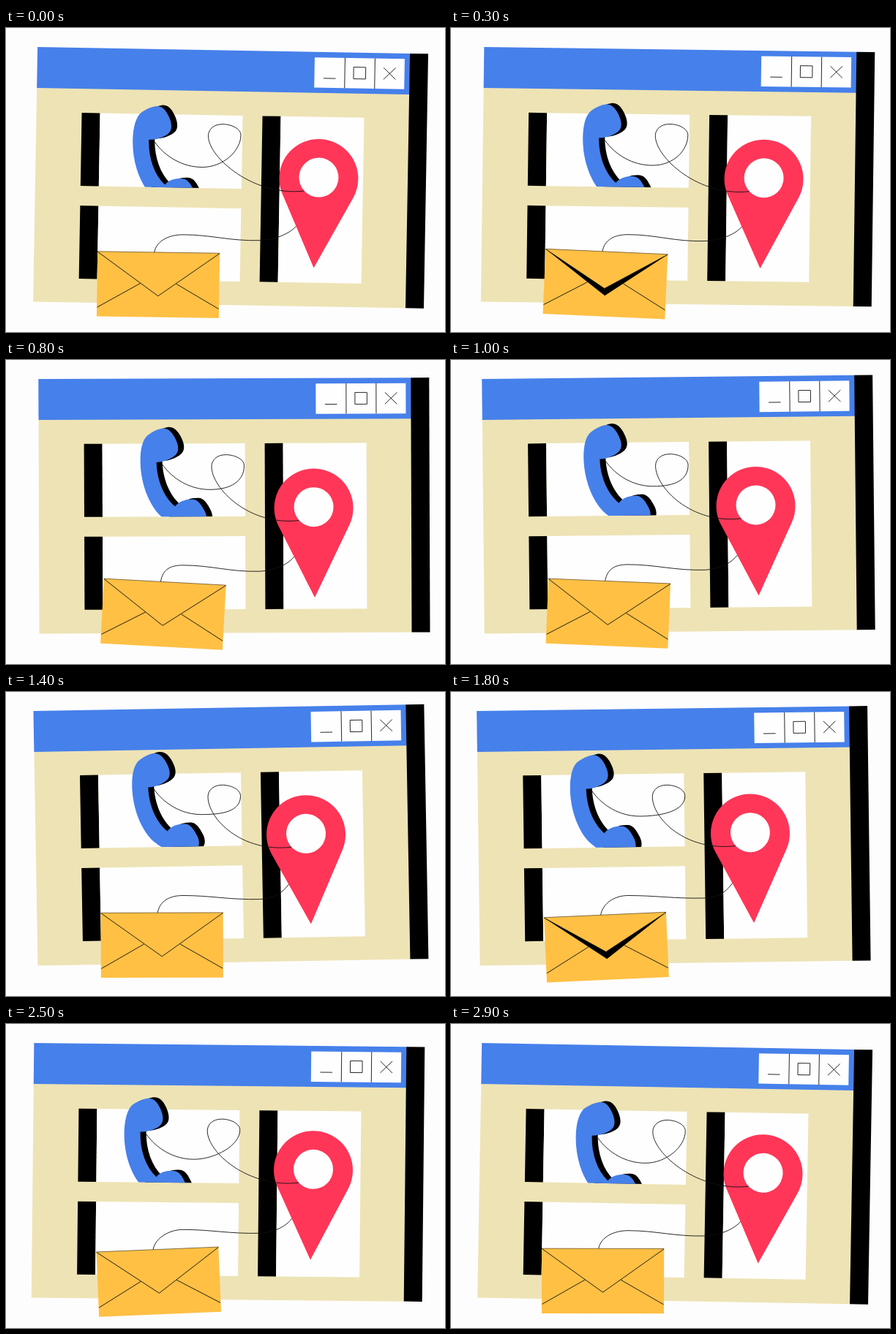
These frames come from a looping animation (600x416 px, 3 s). An HTML page with a canvas:

```html
<!DOCTYPE html>
<html lang="en">
<head>
<meta charset="utf-8">
<title>Contact window</title>
<style>
  html, body { margin: 0; width: 100%; height: 100%; overflow: hidden; background: #fefdfe; }
  canvas { display: block; width: 600px; height: 416px; }
</style>
</head>
<body>
<canvas id="stage" width="600" height="416"></canvas>
<script>
const LOOP = 3000, STEP = 100;
const BLUE = '#4680ea', CREAM = '#eee3b5', YELLOW = '#ffc044', RED = '#ff3658';
const PAPER = '#fefdfe', WHITE = '#fefefe', BLACK = '#000';
const ctx = document.getElementById('stage').getContext('2d');

// Handset outline around its inner corner
const handset = new Path2D(`M-6 1C2 1 13-2 20-8C26-13 25-22 20-32C15-42 9-46 2-45
  C-4-44-10-41-16-37C-25-31-28-15-28 1C-28 35-14 66 2 78C15 90 40 96 54 90
  C62 86 62 77 58 69C54 61 50 54 43 53C33 52 23 55 18 62C2 48-6 24-6 1Z`);

// Periodic sway: mean, amplitude, time of the maximum, and a bob at twice the rate
const wave = (t, period) => Math.cos(t / period * 2 * Math.PI);
const sway = (t, mean, amp, peak, bob = 0) =>
  mean + amp * wave(t - peak, LOOP) + bob * wave(t - 660, LOOP / 2);
const rad = deg => deg * Math.PI / 180;

function place(x, y, deg) {
  ctx.translate(x, y);
  ctx.rotate(rad(deg));
}

function turn(o, deg, x, y) {
  const c = Math.cos(rad(deg)), s = Math.sin(rad(deg));
  return { x: o.x + x * c - y * s, y: o.y + x * s + y * c };
}

function rect(color, x1, y1, x2, y2) {
  ctx.fillStyle = color;
  ctx.fillRect(x1, y1, x2 - x1, y2 - y1);
}

function poly(...pts) {
  ctx.beginPath();
  for (let i = 0; i < pts.length; i += 2) ctx.lineTo(pts[i], pts[i + 1]);
}

function line(...pts) {
  poly(...pts);
  ctx.stroke();
}

function pose(t) {
  return {
    win: { x: sway(t, 40.2, 5.5, 1000, 0.4), y: 374.4, r: sway(t, 0, 1, -50) },
    phone: { x: sway(t, 199.5, 12.5, 680), y: sway(t, 140.5, 11.5, -20), r: sway(t, 0, 2.3, -270) },
    pin: { x: sway(t, 418.3, 4.6, 500), y: sway(t, 322.5, 6.6, 240), r: sway(t, 0, 3.2, -50) },
    mail: { x: sway(t, 211.6, 3.2, 1170, 1.2), y: sway(t, 349.7, 3.1, -370, 0.7), r: sway(t, 0, 3.3, 630) },
    loop: { x: sway(t, 1.7, 2.8, 670, 1.3), y: sway(t, 2.4, 2.3, 100) }
  };
}

function enterWindow(w) {
  place(w.x, w.y, w.r);
  ctx.translate(-36, -374.4);
}

function panel(x, y, right, bottom) {
  rect(BLACK, x, y, x + 25, bottom);
  rect(WHITE, x + 25, y, right, bottom);
}

function drawWindow(w) {
  ctx.save();
  enterWindow(w);
  rect(CREAM, 36, 81, 545.5, 374.4);
  rect(BLUE, 36, 26, 545.5, 82);
  rect(BLACK, 545, 26, 570, 374.4);
  panel(98, 115, 318, 215);
  panel(98, 242, 318, 342);
  panel(345, 115, 484, 342);
  rect(WHITE, 415, 33.5, 538, 75);
  line(456.5, 33.5, 456.5, 75);
  line(497.5, 33.5, 497.5, 75);
  line(427.5, 62, 444, 62);
  ctx.strokeRect(468.5, 46, 16.5, 16);
  line(509.5, 46, 526, 62);
  line(526, 46, 509.5, 62);
  ctx.restore();
}

function drawPhoneCord(p, loop, pin) {
  const { x, y } = p, dx = loop.x, dy = loop.y;
  const hole = turn(pin, pin.r, 0, -124);
  const ex = hole.x - 20, ey = hole.y + 18.5;
  const left = 275.5 + dx, right = 320 + dx;
  ctx.beginPath();
  ctx.moveTo(x + 2, y + 4);
  ctx.bezierCurveTo(x + 16, y + 24, x + 40, y + 38.5, x + 67, y + 38.5);
  ctx.bezierCurveTo(x + 96, y + 38.5, right, 163 + dy, right, 142 + dy);
  ctx.bezierCurveTo(right, 133 + dy, 307 + dx, 127 + dy, 295 + dx, 127 + dy);
  ctx.bezierCurveTo(283 + dx, 127 + dy, left, 134 + dy, left, 143 + dy);
  ctx.bezierCurveTo(left, 173 + dy, ex - 68, ey + 8, ex, ey);
  ctx.stroke();
}

function drawMailCord(t, mail, pin) {
  const s = turn(mail, mail.r, -6, -44);
  const e = turn(pin, pin.r, -21, -66);
  const cx = 242, cy = sway(t, 280.6, 2.3, 100);
  const mx = 346, my = sway(t, 286.8, 4.8, 300);
  ctx.beginPath();
  ctx.moveTo(s.x, s.y);
  ctx.bezierCurveTo(s.x + 3, s.y - 17, cx - 18, cy, cx, cy);
  ctx.bezierCurveTo(cx + 38, cy, mx - 40, my + 1, mx, my);
  ctx.bezierCurveTo(mx + 22, my - 1, e.x - 9, e.y + 20, e.x, e.y);
  ctx.stroke();
}

function drawPhone(w, p) {
  ctx.save();
  ctx.save();
  enterWindow(w);
  ctx.beginPath();
  ctx.rect(98, 0, 220, 215);
  ctx.restore();
  ctx.clip();
  place(p.x, p.y, p.r);
  ctx.translate(8, -1.7);
  ctx.fillStyle = BLACK;
  ctx.fill(handset);
  ctx.translate(-8, 1.7);
  ctx.fillStyle = BLUE;
  ctx.fill(handset);
  ctx.restore();
}

function drawPin(p) {
  const R = 54, D = 122.5, a = Math.asin(R / D);
  ctx.save();
  place(p.x, p.y, p.r);
  ctx.fillStyle = RED;
  ctx.beginPath();
  ctx.moveTo(0, 0);
  ctx.arc(0, -D, R, Math.PI - a, a);
  ctx.closePath();
  ctx.fill();
  ctx.fillStyle = WHITE;
  ctx.beginPath();
  ctx.arc(0, -D - 1.4, 27, 0, 2 * Math.PI);
  ctx.fill();
  ctx.restore();
}

function drawMail(t, m) {
  // The flap lifts twice per loop and shows its shadow
  const p = t % (LOOP / 2) / 800;
  const lift = p < 1 ? 10 * Math.sin(Math.PI * p) : 0;
  const tipX = -1.8 * lift * p ** 3, tipY = 15.5 - lift;
  ctx.save();
  place(m.x, m.y, m.r);
  rect(YELLOW, -83.5, -44.5, 83.5, 44.5);
  line(-83, 32, -24.5, -1.5);
  line(83, 32, 24.5, -1.5);
  if (lift > 0.1) {
    poly(-83.5, -44, tipX, tipY, 83.5, -44, 0, 16);
    ctx.fillStyle = BLACK;
    ctx.fill();
  }
  line(-83.5, -44, tipX, tipY, 83.5, -44);
  ctx.lineWidth = 0.5;
  line(-83.5, -44.3, 83.5, -44.3);
  ctx.restore();
}

function draw(t) {
  const { win, phone, pin, mail, loop } = pose(t);
  rect(PAPER, 0, 0, 600, 416);
  ctx.strokeStyle = '#111';
  ctx.lineWidth = 0.9;
  drawWindow(win);
  drawMailCord(t, mail, pin);
  drawPin(pin);
  drawPhoneCord(phone, loop, pin);
  drawPhone(win, phone);
  drawMail(t, mail);
}

const start = performance.now();
function tick() {
  const t = (performance.now() - start) % LOOP;
  draw(Math.floor(t / STEP) * STEP);
  requestAnimationFrame(tick);
}
tick();
</script>
</body>
</html>
```
